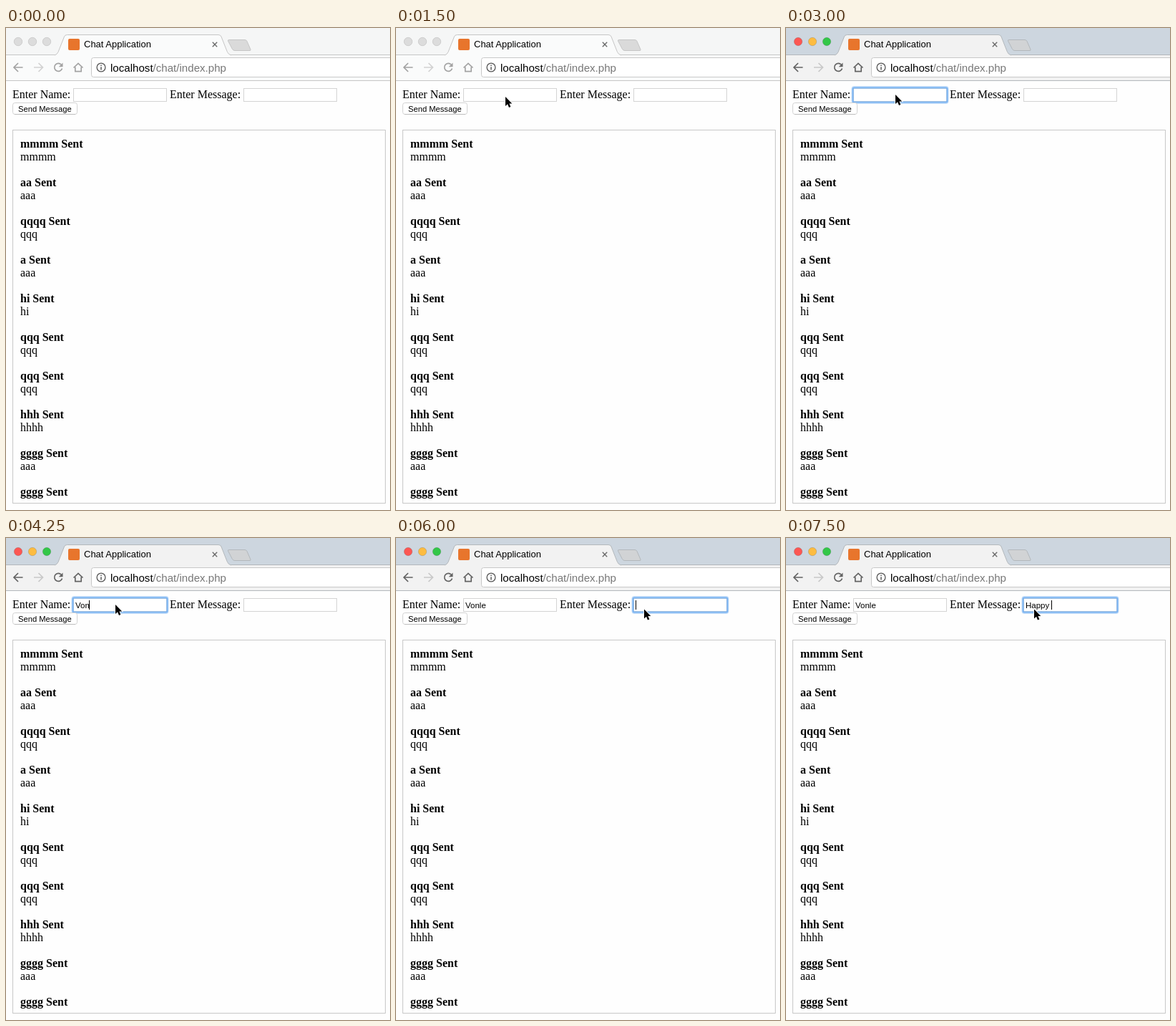
Animation, 537 px wide and 673 px high, one loop 8 s. Source, as an HTML page:

```html
<!DOCTYPE html>
<html lang="en">
<head>
<meta charset="utf-8">
<title>Chat Application</title>
<style>
  html, body { margin: 0; width: 100%; height: 100%; overflow: hidden; background: #fefefe; }
  svg { display: block; }
  text { font-family: "Liberation Sans", Arial, sans-serif; white-space: pre; }
  .page { font: 16px "Liberation Serif", Times, serif; }
  .bold { font-weight: bold; }
  .typed { font-size: 11.5px; }
  .icon { fill: none; stroke: var(--icon); stroke-width: 1.7; }
  .field { fill: #fff; stroke: #d4d4d4; }
  .ring { fill: none; stroke: #7ab3f1; stroke-width: 3; }
  #browser { --strip: #f5f6f6; --bar: #fafbfb; --edge: #c6c6c6; --icon: #a3a3a3; --faint: #d2d2d2;
    --red: #dcdcdc; --yellow: #dcdcdc; --green: #dcdcdc; --rim: #cecece; --plus: #dadada; }
  #browser.active { --strip: #cdd6df; --bar: #f2f2f2; --edge: #b3b8bc; --icon: #636363; --faint: #c8c8c8;
    --red: #fc5753; --yellow: #fdbc40; --green: #33c748; --rim: #0002; --plus: #d1d3d5; }
</style>
</head>
<body>
<svg width="537" height="673" viewBox="0 0 537 673">
  <g id="browser">
    <rect width="537" height="37" fill="var(--strip)"/>
    <rect y="37" width="537" height="36" fill="var(--bar)"/>
    <path d="M0 37.5H537M0 73.5H537" stroke="var(--edge)"/>
    <g stroke="var(--rim)">
      <circle cx="17" cy="19" r="5.7" fill="var(--red)"/>
      <circle cx="37" cy="19" r="5.7" fill="var(--yellow)"/>
      <circle cx="57" cy="19" r="5.7" fill="var(--green)"/>
    </g>
    <path d="M68 38Q71.500 37 73 33.500L81.500 12Q82.500 9.500 85.500 9.500H297Q300 9.500 301 12L309.500 33.500Q311 37 315 38" fill="var(--bar)" stroke="var(--edge)"/>
    <path d="M312 16.500H334Q336 16.500 337 18.500L342 30Q342.500 31.500 341 31.500H320Q317.500 31.500 316.500 29.500L310.500 18Q310 16.500 312 16.500Z" fill="var(--plus)" stroke="var(--edge)"/>
    <rect x="87" y="15" width="16" height="16" rx="2" fill="#e8752c"/>
    <text x="109" y="27" font-size="13">Chat Application</text>
    <path d="M288.800 19.800l6.400 6.400m0 -6.400l-6.400 6.400" stroke="#666" stroke-width="1.300"/>

    <path class="icon" d="M23.500 55H11.500M17 49L11 55L17 61"/>
    <path class="icon" d="M39 55H51M45.500 49L51.500 55L45.500 61" style="stroke:var(--faint)"/>
    <path class="icon" d="M77.300 51.200A5.500 5.500 0 1 0 78.500 56.500"/>
    <path d="M79.500 48.500V54.300H73.700Z" fill="var(--icon)"/>
    <path class="icon" d="M94.500 55.500L101 49.500L107.500 55.500M96.800 54.500V60.700H105.200V54.500" stroke-width="1.500"/>
    <rect x="119.500" y="41.500" width="430" height="27" rx="3" fill="#fff" stroke="#c8c8c8"/>
    <circle cx="133" cy="55" r="5.900" fill="none" stroke="#555" stroke-width="1.300"/>
    <path d="M133 51.400V53M133 54.200V58.600" stroke="#555" stroke-width="1.500"/>
    <text x="146" y="61" font-size="15.100">localhost<tspan fill="#777">/chat/index.php</tspan></text>
  </g>

  <text class="page" x="9" y="98">Enter Name:</text>
  <text class="page" x="229" y="98">Enter Message:</text>
  <g id="fields"></g>
  <rect x="9.500" y="104.500" width="90" height="16" rx="3" fill="#fff" stroke="#d2d2d2"/>
  <path d="M12 120.500H97" stroke="#bdbdbd"/>
  <text x="17" y="117" font-size="11.200">Send Message</text>

  <rect x="9.500" y="142.500" width="521" height="521" fill="none" stroke="#c8c8c8"/>
  <g id="log"></g>

  <path id="pointer" d="M0 0V13L3 10.300L5 15L7.400 14L5.400 9.400H9.300Z" fill="#000" stroke="#fff" stroke-width="1.600" paint-order="stroke"/>
</svg>
<script>
const DURATION = 8000;
const NAME = "Vonle", MESSAGE = "Happy ";
const $ = id => document.getElementById(id);

const messages = [["mmmm", "mmmm"], ["aa", "aaa"], ["qqqq", "qqq"], ["a", "aaa"], ["hi", "hi"],
  ["qqq", "qqq"], ["qqq", "qqq"], ["hhh", "hhhh"], ["gggg", "aaa"], ["gggg", ""]];
$("log").innerHTML = messages.map(([sender, body], i) => `
  <text class="page bold" x="20" y="${167 + 54 * i}">${sender} Sent</text>
  <text class="page" x="20" y="${185 + 54 * i}">${body}</text>`).join("");

function makeField(x) {
  const group = document.createElementNS("http://www.w3.org/2000/svg", "g");
  group.innerHTML = `
    <rect class="field" x="${x + .5}" y="84.5" width="130" height="18"/>
    <g><rect class="ring" x="${x - 1}" y="82.5" width="133" height="22" rx="2.5" opacity=".45"/>
      <rect class="ring" x="${x - .5}" y="83.5" width="132" height="20" rx="1.5" style="stroke-width:2"/></g>
    <text class="typed" x="${x + 3}" y="98"></text>
    <rect y="87" width="1" height="13"/>`;
  $("fields").append(group);
  const [, ring, text, caret] = group.children;
  return (value, focused, caretOn) => {
    ring.style.display = focused ? "" : "none";
    caret.style.display = focused && caretOn ? "" : "none";
    text.textContent = value;
    const width = value ? text.getComputedTextLength() : 0;
    caret.setAttribute("x", Math.floor(x + 3 + width));
  };
}
const drawName = makeField(94), drawMessage = makeField(332);

// Each step is [start time, value]; a value holds until the next step.
const pointerSteps = [[0, null], [250, [334, 67]], [500, [213.5, 89]], [750, [177, 95]], [1000, [169, 96]],
  [1250, [152.5, 96]], [1500, [153, 96]], [2500, [153, 93]], [5000, [163, 97]], [5250, [288, 107.5]],
  [5500, [331, 97]], [5750, [347, 99.5]]];
const nameSteps = [[0, 0], [4000, 1], [4250, 3], [4500, 4], [4750, 5]];
const messageSteps = [[0, 0], [6500, 1], [6750, 2], [7000, 4], [7250, 5], [7500, 6]];
const caretSteps = [[0, true], [3000, false], [3500, true], [5250, false], [5750, true]];
const valueAt = (steps, t) => steps.findLast(([start]) => start <= t)[1];

function draw(t) {
  $("browser").classList.toggle("active", t >= 1750);
  const caretOn = valueAt(caretSteps, t);
  drawName(NAME.slice(0, valueAt(nameSteps, t)), t >= 2500 && t < 6000, caretOn);
  drawMessage(MESSAGE.slice(0, valueAt(messageSteps, t)), t >= 6000, caretOn);
  const position = valueAt(pointerSteps, t);
  $("pointer").style.display = position ? "" : "none";
  if (position) $("pointer").setAttribute("transform", `translate(${position})`);
}

const begin = performance.now();
function tick() {
  draw((performance.now() - begin) % DURATION);
  requestAnimationFrame(tick);
}
tick();
</script>
</body>
</html>
```
